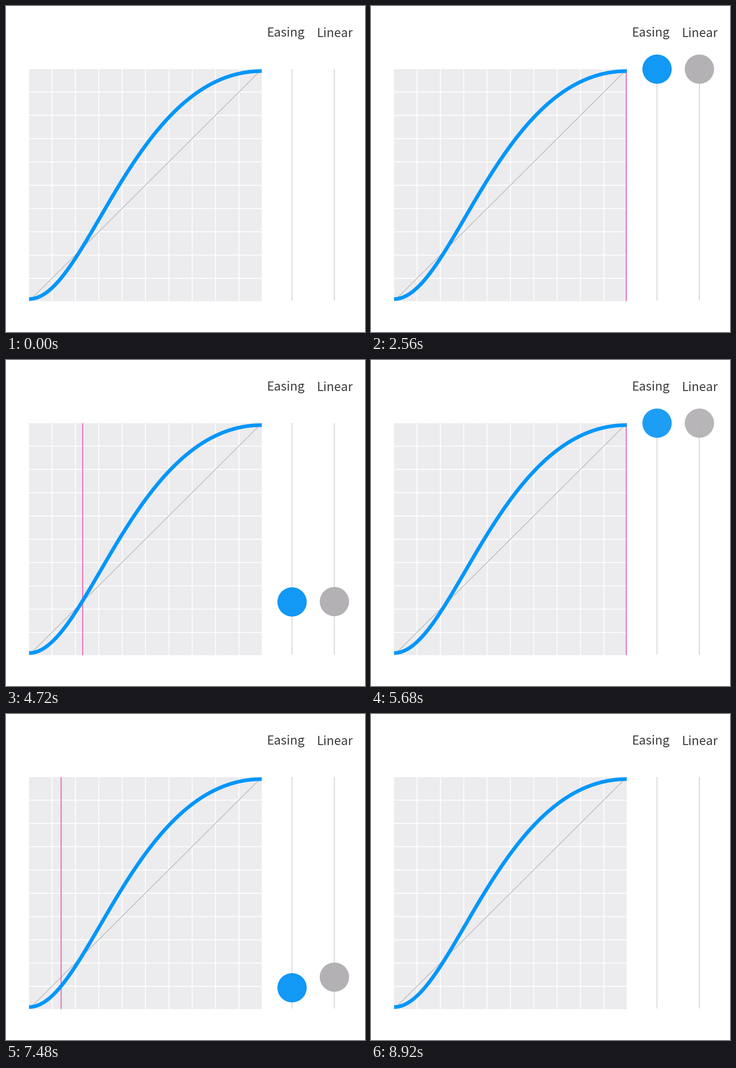
Recreate the animation shown at these times as a matplotlib script. Size 784x714 px, loop 9040 ms.

```python
import numpy as np
import matplotlib.pyplot as plt
from matplotlib.animation import FuncAnimation
from matplotlib.patches import Circle, Rectangle

W, H, DPI = 784, 714, 100
STEP, LOOP = 40, 9040
PX = 72 / DPI  # points per pixel

LEFT, RIGHT, TOP, BOTTOM = 50.4, 558.5, 138.4, 646.4
BLUE, GREY, PINK, INK = "#1298f5", "#b3b1b4", "#e45ab2", "#3d3d3f"
FADE_IN, FADE_OUT = 340, 300

# each run: appear, move, move duration, disappear (ms)
RUNS = [
    (850, 1857, 500, 2705),
    (3770, 4565, 675, 5665),
    (6640, 7357, 900, 8610),
]

# control points of the easing curve
X1, Y1, X2, Y2 = 0.25, 0.0, 0.45, 1.0


def bezier(s, a, b):
    return 3 * a * s * (1 - s) ** 2 + 3 * b * s ** 2 * (1 - s) + s ** 3


S = np.linspace(0, 1, 400)
CURVE_X, CURVE_Y = bezier(S, X1, X2), bezier(S, Y1, Y2)


def ease(p):
    return np.interp(p, CURVE_X, CURVE_Y)


def clamp(v):
    return min(max(v, 0.0), 1.0)


def state(ms):
    """Opacity and linear progress at a time."""
    for appear, move, span, vanish in RUNS:
        if appear <= ms < vanish + FADE_OUT:
            alpha = clamp((ms - appear) / FADE_IN) - clamp((ms - vanish) / FADE_OUT)
            return clamp(alpha), clamp((ms - move) / span)
    return 0.0, 0.0


fig = plt.figure(figsize=(W / DPI, H / DPI), dpi=DPI, facecolor="white")
ax = fig.add_axes([0, 0, 1, 1])
ax.set_xlim(0, W)
ax.set_ylim(H, 0)
ax.axis("off")


def line(xs, ys, color, width, z):
    return ax.plot(xs, ys, color=color, lw=width * PX, zorder=z,
                   solid_capstyle="butt", snap=False)[0]


def ball(x, color):
    return ax.add_patch(Circle((x, BOTTOM), 32, fc=color, ec="none", zorder=6))


def label(x, y, text):
    ax.text(x, y, text, family="Noto Sans CJK JP", size=27 * PX, color=INK,
            ha="left", va="baseline")


ax.add_patch(Rectangle((LEFT, TOP), RIGHT - LEFT, BOTTOM - TOP,
                       fc="#ecebed", ec="none", snap=False))
for i in range(9):
    gx, gy = 100.6 + 51 * i, 188.6 + 51 * i
    line([gx, gx], [TOP, BOTTOM], "white", 2, 2)
    line([LEFT, RIGHT], [gy, gy], "white", 2, 2)

line([LEFT, RIGHT], [BOTTOM, TOP], "#bebdbf", 1.7, 3)
line(LEFT + (RIGHT - LEFT) * CURVE_X, 641.8 - 499.2 * CURVE_Y, "#0096fb", 8, 5)

EASE_X, LINEAR_X = 624.7, 717.2
for x in (EASE_X, LINEAR_X):
    line([x - 0.2, x - 0.2], [138, 645], "#d3d3d5", 1.9, 2)

label(569, 67, "Easing")
label(678, 68, "Linear")

marker = line([LEFT, LEFT], [TOP, BOTTOM], PINK, 2, 4)
eased = ball(EASE_X, BLUE)
linear = ball(LINEAR_X, GREY)


def place(p):
    return 645.6 - 507.3 * p


def draw(i):
    alpha, p = state(i * STEP)
    x = 51.2 + 506.3 * p
    marker.set_xdata([x, x])
    eased.center = EASE_X, place(ease(p))
    linear.center = LINEAR_X, place(p)
    for part in (marker, eased, linear):
        part.set_alpha(alpha)
    return marker, eased, linear


anim = FuncAnimation(fig, draw, frames=LOOP // STEP, interval=STEP,
                     repeat=True, repeat_delay=0, blit=False)
plt.show()
```
